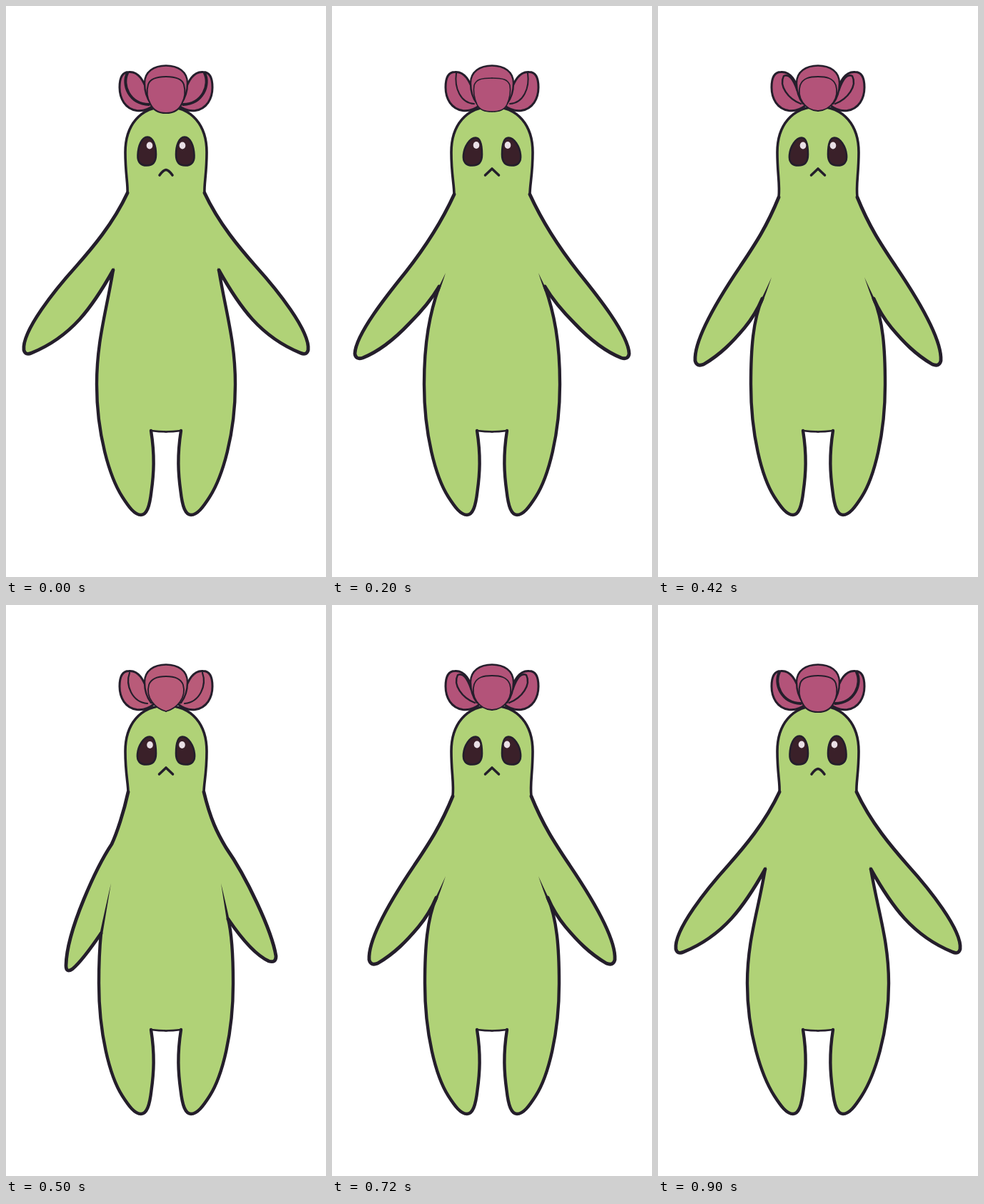
Recreate the animation shown at these times as an HTML page with a canvas. Size 448 px wide and 800 px high, loop 1100 ms.

```html
<!DOCTYPE html>
<html lang="en">
<head>
<meta charset="utf-8">
<title>Cactus flapping its arms</title>
<style>
html, body { margin: 0; width: 100%; height: 100%; overflow: hidden; background: #fff; }
canvas { display: block; width: 448px; height: 800px; }
</style>
</head>
<body>
<canvas id="stage" width="448" height="800"></canvas>
<script>
const ctx = document.getElementById('stage').getContext('2d');
const INK = '#241e2b', GREEN = '#b0d277', PINK = '#b35379', EYE = '#3a2029';

// All paths describe the left half; the right half is mirrored about x = 224.
const arms = {
  high: {
    neck: '170,262', waist: 127, crease: '152,366', pit: '147,384',
    arm: 'C150,305 120,340 98,365 C70,396 22,455 25,482 Q27,490 36,486 C58,477 82,462 103,439 C121,419 136,395 150,370',
    side: ['140,430', 470]
  },
  raised: {
    neck: '171,264', waist: 129, crease: '159,374', pit: '148,400',
    arm: 'C150,310 125,345 103,373 C78,404 33,460 32,487 Q33,496 43,493 C68,483 90,464 108,445 C126,427 140,410 150,393',
    side: ['137,430', 470]
  },
  lowered: {
    neck: '169,268', waist: 130, crease: '159,380', pit: '144,416',
    arm: 'C152,310 135,335 115,365 C90,402 50,465 52,497 Q54,506 64,502 C88,488 105,470 121,451 C131,439 140,424 146,410',
    side: ['133,440', 480]
  },
  lowLeft: {
    neck: '171,262', waist: 130, crease: '147,390', pit: '133,462',
    arm: 'C165,290 155,320 148,335 C128,365 85,455 84,505 Q84,516 93,510 C105,500 118,482 133,460',
    side: ['131,480', 500]
  },
  lowRight: {
    neck: '171,262', waist: 130, crease: '147,390', pit: '137,442',
    arm: 'C162,300 152,320 140,340 C112,380 76,455 70,492 Q70,502 80,499 C100,490 120,465 137,440',
    side: ['132,460', 490]
  }
};
arms.wide = { ...arms.high, waist: 125 };

const uprightEye = 'M198,183.5 C206,183.5 210,196 210,208 C210,219 205,223.5 197,223.5 C189,223.5 184,219 184.5,209 C185,196 190,183.5 198,183.5Z';
const tiltedEye = 'M201,184.5 C208,184.5 210,196 210,208 C210,219 205,223.5 196.5,223.5 C188,223.5 183,219 184,209 C185,197 193,184.5 201,184.5Z';
const frown = 'M214.5,237 L224,228 L233.5,237';
const roundFrown = 'M215,237 Q220,230 224,229.5 Q228,230 233,237';

const faces = {
  high: {
    eye: uprightEye, glint: [201, 195.5], mouth: roundFrown, pink: PINK, fold: 4,
    petal: 'M170,94 C162,110 172,137 200,138',
    bud: 'M224,99 C212,99 202,101 199,110 C196,121 198,130 202,137 C206,146 213,150 224,150', rim: 2
  },
  raised: {
    eye: tiltedEye, glint: [202, 195], mouth: frown, pink: PINK, fold: 2,
    petal: 'M174,94 C171,115 180,136 199,137',
    bud: 'M224,101 C208,101 202,103 199,111 C197,122 200,131 203,138 C207,146 214,148 224,148', rim: 1.6
  },
  lowered: {
    eye: tiltedEye, glint: [203, 195.5], mouth: frown, pink: PINK, fold: 2.4,
    petal: 'M195,119 C189,101 183,95 176,98 C169,112 182,130 200,137',
    bud: 'M224,99 C212,99 203,101 199,111 C194,128 205,146 224,147', rim: 1.8
  },
  low: {
    eye: tiltedEye, glint: [201.5, 196], mouth: frown, pink: '#b95b79', fold: 2.2,
    petal: 'M173,95 C167,112 176,136 198,138',
    bud: 'M224,100 C212,100 203,103 200,112 C195,130 209,145 224,149', rim: 1.8
  }
};

const steps = [
  [200, 'high', 'high', 'high'],
  [300, 'raised', 'raised', 'raised'],
  [500, 'lowered', 'lowered', 'lowered'],
  [600, 'lowLeft', 'lowRight', 'low'],
  [800, 'lowered', 'lowered', 'lowered'],
  [900, 'raised', 'raised', 'raised'],
  [1100, 'wide', 'wide', 'high']
];

function paint(path, fill, width) {
  const shape = new Path2D(path);
  if (fill) {
    ctx.fillStyle = fill;
    ctx.fill(shape);
  }
  if (width) {
    ctx.lineWidth = width;
    ctx.stroke(shape);
  }
}

function dot(x, y, rx, ry, color) {
  ctx.fillStyle = color;
  ctx.beginPath();
  ctx.ellipse(x, y, rx, ry, 0, 0, Math.PI * 2);
  ctx.fill();
}

function setSide(mirrored) {
  ctx.setTransform(mirrored ? -1 : 1, 0, 0, 1, mirrored ? 448 : 0, 0);
}

function bothSides(draw) {
  [false, true].forEach(mirrored => { setSide(mirrored); draw(mirrored); });
  setSide(false);
}

function drawBody({ neck, waist, crease, pit, arm, side }) {
  const shoulder = arm.slice(arm.lastIndexOf(' ') + 1);
  const head = `M225,141 C187,141 167,168 167,205 C167,235 171,250 ${neck}`;
  const leg = `C${side[0]} ${waist},${side[1]} ${waist},530 C${waist},600 145,660 163,688`
    + ' C172,702 180,713 189,713 C197,713 201,702 203.5,680 C207,655 208.5,630 203,595';
  const crotch = 'Q214,596.5 225,596.5';
  paint(head + arm + leg + crotch, GREEN);
  paint(head, null, 3.6);
  paint(`M${neck}${arm}`, null, 4.8);
  paint(`M${shoulder}${leg}`, null, 4.4);
  paint(`M203,595${crotch}`, null, 2.6);

  // Tapered crease running up from the armpit
  const [x, y] = pit.split(',').map(Number);
  const [tipX, tipY] = crease.split(',').map(Number);
  const midX = (x + tipX) / 2 - 1, midY = (y + tipY) / 2 + 3;
  paint(`M${crease} Q${midX - 1},${midY} ${x - 2},${y} L${x + 2},${y} Q${midX + 1.5},${midY} ${crease}Z`, INK);
}

function drawFlower({ pink, petal, fold, bud, rim }) {
  bothSides(() => {
    paint('M172,92.5 C186,91 193,106 198,120 L207,139 C200,145 192,147.5 183,146.5 C167,144 159,130 159,114 C159,101 163,92.5 172,92.5Z', pink, 3);
    paint(petal, null, fold);
  });
  paint('M203,137 C196,128 194,116 194,108 C194,92 207,83.5 224,83.5 C241,83.5 254,92 254,108 C254,116 252,128 245,137Z', pink, 2.4);
  bothSides(() => paint(bud, pink));
  paint('M223,110 h2 v36 h-2Z', pink);
  bothSides(() => paint(bud, null, rim));
}

function drawFace({ eye, glint: [x, y], mouth }) {
  bothSides(() => {
    paint(eye, EYE, 2.6);
    dot(x, y, 4.3, 5, '#eadfe6');
  });
  paint(mouth, null, 3.6);
}

function render(now) {
  const time = now % 1100;
  const [, left, right, face] = steps.find(([end]) => time < end);
  setSide(false);
  ctx.fillStyle = '#fff';
  ctx.fillRect(0, 0, 448, 800);
  ctx.strokeStyle = INK;
  ctx.lineCap = ctx.lineJoin = 'round';
  bothSides(mirrored => drawBody(arms[mirrored ? right : left]));
  drawFlower(faces[face]);
  drawFace(faces[face]);
}

let start;
function tick(now) {
  start ??= now;
  render(now - start);
  requestAnimationFrame(tick);
}
render(0);
requestAnimationFrame(tick);
</script>
</body>
</html>
```
